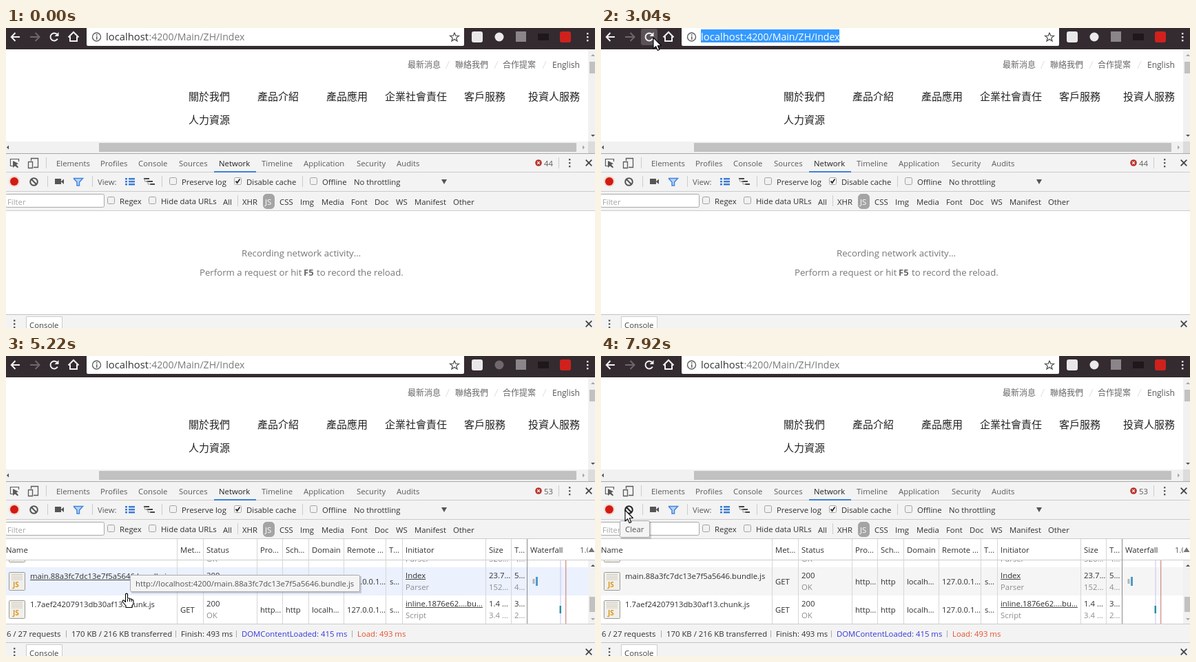
Recreate the animation shown at these times as an HTML page with a canvas. Size 855x436 px, loop 8000 ms.

```html
<!DOCTYPE html>
<html lang="en">
<head>
<meta charset="utf-8">
<title>Network panel reload</title>
<style>
  html, body { margin: 0; width: 100%; height: 100%; overflow: hidden; background: #fff; }
  canvas { display: block; }
</style>
</head>
<body>
<canvas id="stage" width="855" height="436"></canvas>
<script>
const ctx = document.getElementById('stage').getContext('2d', { alpha: false });
const LOOP = 8000, STEP = 78;
const GREY = '#5a5a5a', DARK = '#303030', PALE = '#8c8c8c', EDGE = '#ccc', PANEL = '#f3f3f3';

// Pointer moves: start time, number of steps, from x, y, to x, y
const MOVES = [
  [260, 3, 618, 300, 416, 173], [560, 3, 405, 176, 345, 92], [880, 3, 330, 70, 281, 15],
  [1350, 2, 292, 18, 296, 18], [1880, 1, 297, 24, 297, 24], [2190, 11, 292, 27, 76, 14],
  [3900, 1, 81, 15, 81, 15], [4290, 4, 100, 40, 150, 167], [4740, 4, 155, 215, 178, 310],
  [5060, 3, 178, 318, 175, 345], [5300, 4, 190, 335, 229, 298], [7000, 1, 248, 280, 248, 280],
  [7080, 1, 261, 262, 261, 262], [7160, 1, 663, 52, 663, 52], [7310, 1, 178, 207, 178, 207],
  [7540, 4, 160, 194, 34, 222], [7920, 1, 35, 224, 35, 224]
];

function rect(x, y, w, h, color) {
  ctx.fillStyle = color;
  ctx.fillRect(x, y, w, h);
}
function frame(x, y, w, h, fill, edge, radius = 0) {
  ctx.beginPath();
  ctx.roundRect(x + .5, y + .5, w - 1, h - 1, radius);
  ctx.fillStyle = fill;
  ctx.fill();
  ctx.strokeStyle = edge;
  ctx.lineWidth = 1;
  ctx.stroke();
}
function text(string, x, y, color = DARK, size = 11.35, weight = 400) {
  ctx.font = `${weight} ${size}px "Open Sans", "Noto Sans CJK TC", "Noto Sans CJK", sans-serif`;
  ctx.fillStyle = color;
  ctx.fillText(string, x, y);
}
function trace(points, close) {
  ctx.beginPath();
  for (let i = 0; i < points.length; i += 2) ctx.lineTo(points[i], points[i + 1]);
  if (close) ctx.closePath();
}
function line(points, color, width = 1) {
  trace(points);
  ctx.strokeStyle = color;
  ctx.lineWidth = width;
  ctx.stroke();
}
function shape(points, color) {
  trace(points, true);
  ctx.fillStyle = color;
  ctx.fill();
}
function disc(x, y, r, color) {
  ctx.beginPath();
  ctx.arc(x, y, r, 0, 7);
  ctx.fillStyle = color;
  ctx.fill();
}
function ring(x, y, r, color, width, from = 0, to = 2 * Math.PI) {
  ctx.beginPath();
  ctx.arc(x, y, r, from, to);
  ctx.strokeStyle = color;
  ctx.lineWidth = width;
  ctx.stroke();
}
function cross(x, y, r, color, width) {
  line([x - r, y - r, x + r, y + r], color, width);
  line([x - r, y + r, x + r, y - r], color, width);
}
function dots(x, y, gap, color) {
  for (const i of [-1, 0, 1]) rect(x - 1, y + i * gap - 1, 2.4, 2.4, color);
}
function arrowTip(x, y, dx, dy, color, r = 3) {
  shape([x + dx * r, y + dy * r, x - dy * r, y + dx * r, x + dy * r, y - dx * r], color);
}

function pointerAt(t) {
  const move = MOVES.findLast(m => m[0] <= t);
  if (!move) return null;
  const [start, steps, x0, y0, x1, y1] = move;
  const k = steps > 1 ? Math.min(steps - 1, Math.floor((t - start) / STEP + .01)) / (steps - 1) : 1;
  return { x: Math.round(x0 + (x1 - x0) * k), y: Math.round(y0 + (y1 - y0) * k) };
}

function drawBrowserBar(t, pointer) {
  const white = '#f4f2f3', faded = '#6f676b';
  rect(0, 0, 855, 31, '#332b30');
  if (pointer && pointer.x > 56 && pointer.x < 80 && pointer.y < 27) frame(58, 1, 24, 24, '#5a5257', '#5a5257', 2);
  line([20, 13, 8, 13], white, 2);
  line([13.5, 7, 7.8, 13, 13.5, 19], white, 2);
  line([35, 13, 48, 13], faded, 2);
  line([42.5, 7, 48.5, 13, 42.5, 19], faded, 2);
  if (t >= 3510 && t < 3980) cross(70, 13, 5, white, 2);
  else {
    ring(70, 13, 5.5, white, 2, .5, 5.5);
    shape([76.5, 6, 76.5, 12, 70.5, 12], white);
  }
  line([90.5, 13.5, 98, 6, 105.5, 13.5], white, 2);
  line([93, 12, 93, 19, 103, 19, 103, 12], white, 2);

  ctx.beginPath();
  ctx.roundRect(117, -3, 548, 29, 2);
  ctx.fillStyle = '#fff';
  ctx.fill();
  ring(131.5, 13, 6, '#5f5f5f', 1.4);
  rect(131, 9, 1.5, 2, '#5f5f5f');
  rect(131, 12, 1.5, 5, '#5f5f5f');
  const selected = t >= 1880 && t < 3510;
  if (selected) rect(145, 2, 201, 19, '#3399ff');
  text('localhost', 145, 18, selected ? '#fff' : '#333', 14.8);
  text(':4200/Main/ZH/Index', 207.5, 18, selected ? '#fff' : '#7a7a7a', 14.1);
  if (t >= 1740 && t < 1880) rect(294, 2, 1, 19, '#000');
  const star = [];
  for (let i = 0; i <= 10; i++) {
    const r = i % 2 ? 2.9 : 6.8, a = i * Math.PI / 5;
    star.push(651 + r * Math.sin(a), 13.5 - r * Math.cos(a));
  }
  line(star, '#555', 1.3);

  frame(676, 5, 16, 16, '#e9e7e8', '#e9e7e8', 2);
  disc(716, 13, 6.5, t >= 3670 && t < 6230 ? '#6f686c' : '#eceaeb');
  rect(740, 5, 15, 15, '#8b8589');
  rect(772, 8, 16, 10, '#1e181b');
  frame(804, 5, 16, 16, '#d0211c', '#d0211c', 2);
  dots(844, 13, 5, white);
}

function drawPage(t) {
  rect(0, 31, 855, 134, '#fff');
  if (t < 3670 || t >= 3900) {
    const linkHover = t >= 7160 && t < 7310;
    text('最新消息', 583, 58, '#666', 12);
    text('聯絡我們', 652, 58, linkHover ? '#222' : '#666', 12);
    text('合作提案', 721, 58, '#666', 12);
    text('English', 793, 58, '#555', 12);
    for (const x of [638.5, 709, 779]) line([x, 59, x + 5, 48], '#dedede');
    [['關於我們', 265], ['產品介紹', 365], ['產品應用', 465], ['企業社會責任', 550],
      ['客戶服務', 665], ['投資人服務', 758]].forEach(([s, x]) => text(s, x, 105, '#222', 15));
    text('人力資源', 265, 139, '#222', 15);
  }
  rect(845, 31, 10, 134, '#f1f1f1');
  rect(847, 49, 8, 17, '#c1c1c1');
  arrowTip(852, 41, 0, -1, '#a3a3a3');
  arrowTip(852, 155, 0, 1, '#505050');
  rect(0, 165, 845, 17, '#f1f1f1');
  rect(135, 167, 693, 13, t >= 560 && t < 716 ? '#a8a8a8' : '#c1c1c1');
  arrowTip(4, 173.5, -1, 0, '#505050');
  arrowTip(837, 173.5, 1, 0, '#a3a3a3');
  rect(845, 165, 10, 17, '#dcdcdc');
}

function checkbox(x, y, checked) {
  frame(x, y, 11, 11, checked ? '#fff' : '#f1f1f1', '#a2a2a2', 2);
  if (checked) line([x + 2.5, y + 5.5, x + 4.6, y + 8, x + 8.5, y + 2.5], '#333', 2);
}

function drawToolbars(t) {
  rect(0, 182, 855, 84, PANEL);
  rect(0, 182, 855, 1, '#a8a8a8');
  for (const y of [209, 237, 265]) rect(0, y, 855, 1, EDGE);

  line([10, 200.5, 6.5, 200.5, 6.5, 190.5, 18.5, 190.5, 18.5, 194], GREY, 1.2);
  shape([10, 193, 10, 203, 13, 200.5, 17, 203.5, 18, 202, 15, 198.5, 18, 197], GREY);
  line([36.5, 193, 36.5, 189.5, 46.5, 189.5, 46.5, 202.5, 40, 202.5], GREY, 1.3);
  line([32.5, 194.5, 38.5, 194.5, 38.5, 203.5, 32.5, 203.5, 32.5, 194], GREY, 1.3);
  [['Elements', 73], ['Profiles', 137], ['Console', 192], ['Sources', 251], ['Timeline', 371],
    ['Application', 432], ['Security', 509], ['Audits', 567]].forEach(([s, x]) => text(s, x, 201, GREY));
  text('Network', 309, 201, '#222');
  rect(302, 208, 61, 2, '#3f82d8');
  if (t < 3590 || t >= 3980) {
    disc(773, 196, 4.8, '#b8352c');
    cross(773, 196, 1.8, '#fff', 1.2);
    text(t < 3590 ? '44' : '53', 781, 201, GREY);
  }
  dots(818, 196, 5, GREY);
  cross(846, 196, 4.3, '#444', 1.8);

  disc(12, 223, 8, '#f6d9cf');
  disc(12, 223, 6, '#d11b12');
  const clearColor = t >= 7700 ? '#222' : '#555';
  ring(40.5, 223.5, 5.3, clearColor, 2);
  line([36.8, 219.8, 44.2, 227.2], clearColor, 2);
  rect(71, 219, 9, 8, '#555');
  shape([80, 223, 84, 219.5, 84, 227, 80, 223.5], '#555');
  trace([98, 218.5, 111.5, 218.5, 106.5, 224, 106.5, 229, 103, 229, 103, 224], true);
  ctx.fillStyle = '#b9d4f6';
  ctx.fill();
  line([98, 218.5, 111.5, 218.5, 106.5, 224, 106.5, 229, 103, 229, 103, 224, 98, 218.5], '#4285dd', 1.5);
  text('View:', 133, 228, GREY);
  for (const y of [218, 222, 226]) {
    rect(173, y, 3, 2.5, '#3c7cd4');
    rect(178, y, 9, 2.5, '#3c7cd4');
  }
  rect(200, 218, 8, 2, '#444');
  rect(204, 222, 9, 2, '#444');
  rect(209, 226, 7, 2, '#444');
  line([201.5, 219, 201.5, 223, 206, 223, 206, 227, 210, 227], '#999');
  for (const [x, y] of [[58, 188], [802, 188], [60, 215], [125, 215], [226, 215], [430, 215], [336, 243]]) rect(x, y, 1, 16, EDGE);
  checkbox(237, 217);
  text('Preserve log', 255, 228);
  checkbox(331, 217, true);
  text('Disable cache', 349, 228);
  checkbox(441, 217);
  text('Offline', 459, 228);
  text('No throttling', 505, 228);
  shape([632, 220, 640, 220, 636, 227], '#555');

  frame(-1, 241, 144, 20, '#fff', '#a9a9a9', 2);
  text('Filter', 2, 257, '#a6a6a6');
  checkbox(147, 245);
  text('Regex', 165, 256);
  checkbox(207, 245);
  text('Hide data URLs', 225, 256);
  frame(373, 241, 17, 22, '#a4a4a4', '#a4a4a4', 5);
  text('JS', 376, 257, '#fff');
  [['All', 315], ['XHR', 343], ['CSS', 397], ['Img', 427], ['Media', 458], ['Font', 501], ['Doc', 535],
    ['WS', 566], ['Manifest', 593], ['Other', 649]].forEach(([s, x]) => text(s, x, 257));
}

function underlined(string, x, y) {
  text(string, x, y);
  rect(x, y + 1, ctx.measureText(string).width, 1, '#444');
}

function fileIcon(y) {
  frame(4, y, 24, 27, '#f1efe9', '#9a9a9a', 1);
  for (let i = 3; i < 12; i += 2.5) rect(8, y + i, 16, 1, '#cfcbc2');
  text('JS', 10, y + 22, '#d9981e', 10, 700);
}

function drawRow(y, background, hovered, row) {
  rect(0, y, 845, 41, hovered ? '#ebf1fd' : background);
  fileIcon(y + 7);
  (hovered ? underlined : text)(row.name, 35, y + 17);
  text('GET', 253, y + 25);
  text('200', 291, y + 16);
  text('OK', 291, y + 33, PALE);
  [['http…', 369], ['http', 406], ['localh…', 444], ['127.0.0.1…', 495], ['s…', 557]]
    .forEach(([s, x]) => text(s, x, y + 25, DARK, 11.2));
  underlined(row.initiator, 580, y + 16);
  text(row.type, 580, y + 33, PALE);
  row.size.forEach((s, i) => text(s, 701, y + 16 + 17 * i, i ? PALE : DARK));
  row.time.forEach((s, i) => text(s, 738, y + 16 + 17 * i, i ? PALE : DARK));
}

const ROWS = [
  { name: 'vendor.349dcd5d25901090df24.bundle.js', initiator: 'Index', type: 'Parser', size: ['88.6…', '526…'], time: ['7…', '4…'] },
  { name: 'main.88a3fc7dc13e7f5a5646.bundle.js', initiator: 'Index', type: 'Parser', size: ['23.7…', '152…'], time: ['5…', '4…'] },
  { name: '1.7aef24207913db30af13.chunk.js', initiator: 'inline.1876e62.…bu…', type: 'Script', size: ['1.4 …', '3.4 …'], time: ['3…', '2…'] }
];
const COLUMNS = [['Name', 0], ['Met…', 253], ['Status', 291], ['Pro…', 369], ['Sch…', 406], ['Domain', 444],
  ['Remote …', 495], ['T…', 556], ['Initiator', 580], ['Size', 701], ['T…', 738], ['Waterfall', 761]];

function drawWaterfall(scaled) {
  if (!scaled) {
    rect(768, 324, 7, 7, '#c9c9c9');
    rect(775, 321, 2.5, 13, '#2fa84f');
    rect(777.5, 321, 2.5, 13, '#2f62c8');
    rect(843, 362, 2, 13, '#3b45d6');
    return;
  }
  rect(804.5, 297, 1, 92, '#c3c3ee');
  rect(812, 297, 1.3, 92, '#d58f8f');
  rect(764.5, 324, 3, 7, '#b3b3b3');
  rect(769, 321, 3, 13, '#4b9bc8');
  rect(803.5, 363, 2.5, 11, '#2b8fa8');
}

function drawTable(t) {
  const hovered = t < 4974 ? -1 : t < 5450 ? 1 : t < 7160 ? 0 : -1;
  const scaled = t >= 4366;
  if (t >= 4974) hovered;
  ctx.save();
  ctx.beginPath();
  ctx.rect(0, 297, 855, 92);
  ctx.clip();
  if (t >= 3900) {
    ROWS.forEach((row, i) => drawRow(266 + 41 * i, i % 2 ? '#f5f5f5' : '#fff', i === hovered && t >= 4974, row));
    rect(757, 297, 88, 0, '#fff');
    drawWaterfall(scaled);
    rect(845, 297, 10, 92, '#f1f1f1');
    rect(847, 350, 8, 22, '#c1c1c1');
    arrowTip(852, 306, 0, -1, '#505050');
    arrowTip(852, 381, 0, 1, '#a3a3a3');
  }
  ctx.restore();
  COLUMNS.forEach(([s, x]) => text(s, x, 286));
  if (scaled) text('1.0', 833, 286, GREY);
  rect(845, 266, 10, 31, '#fff');
  shape([845.5, 285, 854.5, 285, 850, 278], '#777');
  rect(0, 296, 855, 1, EDGE);
  for (const x of [248, 286, 364, 401, 439, 490, 551, 575, 696, 733]) rect(x, 266, 1, 123, '#d6d6d6');
  rect(756, 266, 1, 123, '#8a8a8a');

  rect(0, 389, 855, 27, PANEL);
  rect(0, 389, 855, 1, EDGE);
  if (t >= 3980) {
    text('6 / 27 requests', 1, 408);
    text('170 KB / 216 KB transferred', 95, 408);
    text('Finish: 493 ms', 254, 408);
    text('DOMContentLoaded: 415 ms', 342, 408, '#3438d8');
    text('Load: 493 ms', 510, 408, '#e5502b');
    for (const x of [87, 246, 334, 502]) rect(x, 399, 1, 10, '#aaa');
  }
}

function drawPrompt() {
  text('Recording network activity…', 342, 332, '#777', 13.25);
  text('Perform a request or hit', 281, 360, '#777', 13.2);
  text('F5', 432, 360, '#666', 13, 700);
  text('to record the reload.', 451, 360, '#777', 13.2);
}

function drawDrawer() {
  rect(0, 416, 855, 20, PANEL);
  rect(0, 416, 855, 1, '#c2c2c2');
  dots(12, 430, 5, GREY);
  frame(29, 419, 53, 20, '#fff', EDGE);
  text('Console', 34, 436, '#444');
  cross(846, 430, 4.3, '#444', 1.8);
}

function tooltip(string, x, y) {
  text(string, 0, -50);
  const width = Math.round(ctx.measureText(string).width) + 17;
  rect(x + 2, y + 2, width, 25, 'rgba(0,0,0,.16)');
  frame(x, y, width, 25, '#f4f4f4', '#a8a8a8', 2);
  text(string, x + 8, y + 17, '#555');
}

function drawTooltips(t) {
  const base = 'http://localhost:4200/';
  if (t >= 5060 && t < 5450) tooltip(base + ROWS[1].name, 180, 318);
  if (t >= 5450 && t < 7160) tooltip(base + ROWS[0].name, 226, 312);
  if (t >= 7770) tooltip('Clear', 27, 239);
}

function drawPointer({ x, y }) {
  ctx.save();
  ctx.translate(x, y);
  ctx.lineJoin = 'round';
  const inAddress = x > 118 && x < 665 && y < 26;
  const onLink = (y >= 297 && y < 389 && x < 248) || (y > 46 && y < 60 && x > 583);
  if (inAddress) {
    line([-3.5, -8, -1, -8, 0, -7, 1, -8, 3.5, -8], '#000', 1.3);
    line([0, -7, 0, 8], '#000', 1.5);
    line([-3.5, 8.5, -1, 8.5, 0, 7.5, 1, 8.5, 3.5, 8.5], '#000', 1.3);
  } else {
    trace(onLink
      ? [-1.5, 1, 0, 0, 1.5, 1, 1.5, 7, 4, 7, 4.5, 8, 7, 8, 7.5, 9, 9.5, 9.5, 10, 11, 10, 15, 8, 18, 8, 20.5, -1, 20.5, -1, 18, -6, 12, -5.5, 10, -4, 10, -1.5, 12.5]
      : [0, 0, 0, 16, 3.7, 12.6, 6.2, 18.6, 8.8, 17.5, 6.3, 11.7, 11.4, 11.5], true);
    ctx.fillStyle = '#fff';
    ctx.fill();
    ctx.strokeStyle = '#000';
    ctx.lineWidth = 1.1;
    ctx.stroke();
    if (onLink) for (const k of [1.5, 4.5, 7.2]) line([k, 8, k, 12], '#000');
  }
  ctx.restore();
}

function render(now) {
  const t = now % LOOP, pointer = pointerAt(t);
  rect(0, 0, 855, 436, '#fff');
  drawPage(t);
  drawBrowserBar(t, pointer);
  drawToolbars(t);
  if (t < 3590) drawPrompt();
  else if (t >= 3750) drawTable(t);
  drawDrawer();
  drawTooltips(t);
  if (pointer) drawPointer(pointer);
}

const began = performance.now();
function tick() {
  render(performance.now() - began);
  requestAnimationFrame(tick);
}
tick();
</script>
</body>
</html>
```
